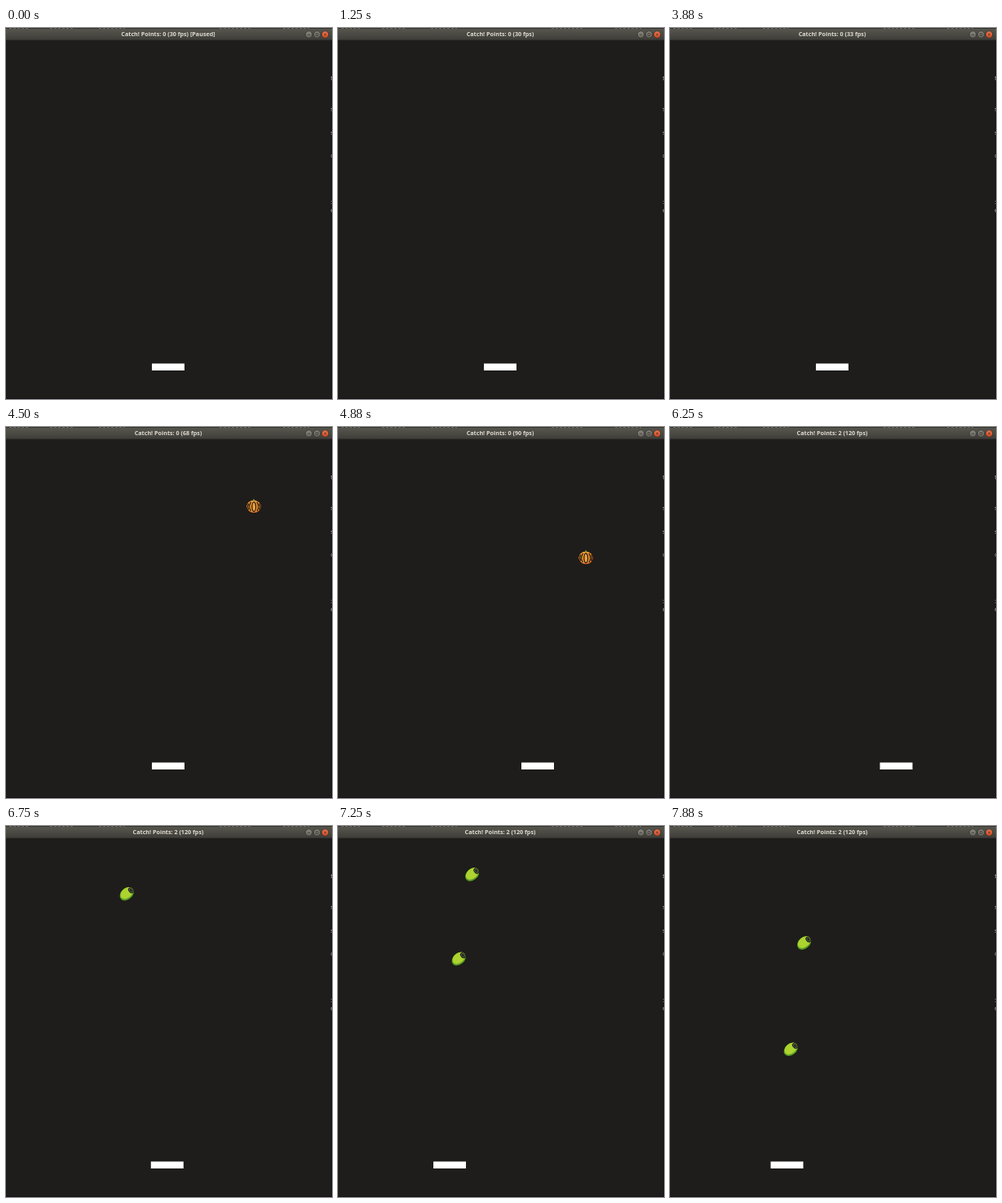
Recreate the animation shown at these times as an HTML page. Size 400 by 455 pixels, loop 8000 ms.

```html
<!DOCTYPE html>
<html lang="en">
<head>
<meta charset="utf-8">
<title>Catch!</title>
<style>
  html, body { margin: 0; width: 100%; height: 100%; overflow: hidden; background: #1e1d1b; }
  svg { display: block; width: 100vw; height: 100vh; }
  text { font-family: "Open Sans", "Noto Sans", sans-serif; }
  #title { font-size: 7.2px; font-weight: 700; fill: #dfdbd2; text-anchor: middle; }
  .edge { font-size: 7px; fill: #b9b9b4; }
</style>
</head>
<body>
<svg viewBox="0 0 400 455">
  <defs>
    <linearGradient id="bar" x2="0" y2="1">
      <stop offset="0" stop-color="#58574f"/>
      <stop offset="1" stop-color="#3e3d38"/>
    </linearGradient>
    <linearGradient id="grey" x2="0" y2="1">
      <stop offset="0" stop-color="#8b887f"/>
      <stop offset="1" stop-color="#66645c"/>
    </linearGradient>
    <linearGradient id="red" x2="0" y2="1">
      <stop offset="0" stop-color="#f0764f"/>
      <stop offset="1" stop-color="#d9481f"/>
    </linearGradient>
    <g id="olive">
      <g transform="rotate(-40)">
        <ellipse rx="10.2" ry="7.6" fill="#151a10"/>
        <ellipse rx="9.6" ry="7" fill="#5a9a28"/>
        <ellipse cx=".7" cy="-.8" rx="8.8" ry="6" fill="#acd32f"/>
        <ellipse cx="6.6" cy="-.1" rx="2.7" ry="3.9" fill="#1c1d18"/>
        <ellipse cx="6.8" cy="-.1" rx="1.5" ry="2.5" fill="none" stroke="#77806a" stroke-width=".7"/>
      </g>
    </g>
    <g id="pumpkin">
      <ellipse cy=".5" rx="9.3" ry="8.2" fill="#17130f"/>
      <ellipse cy=".5" rx="8.8" ry="7.7" fill="#d8682b"/>
      <ellipse cx="-.5" cy="0" rx="8.2" ry="7.2" fill="#f3a138"/>
      <g fill="none" stroke="#2b1b10" stroke-width="1.3">
        <ellipse cy=".8" rx="2.4" ry="5.8"/>
        <path d="M-3.6-5.2Q-7.2 .5-3.8 6M3.6-5.2Q7.2 .5 3.8 6M-6.6-3.4Q-8.4 .5-6.4 4.4M6.6-3.4Q8.4 .5 6.4 4.4"/>
      </g>
      <path d="M-1-5.6L-.7-8.8L.8-8.4L1.1-5.6Z" fill="#9a9a3a"/>
    </g>
  </defs>

  <rect width="400" height="455" fill="#1e1d1b"/>
  <rect id="paddle" y="411.5" width="40" height="8.5" fill="#fff"/>
  <use id="f0" href="#pumpkin"/>
  <use id="f1" href="#olive"/>
  <use id="f2" href="#olive"/>

  <rect width="400" height="15" fill="url(#bar)"/>
  <rect width="400" height="1" fill="#34332f"/>
  <path d="M4 .5H28M54 .5H84M114 .5H146M262 .5H300M340 .5H372" stroke="#77756c" stroke-width=".7" stroke-dasharray="3 2"/>
  <rect y="14.5" width="400" height=".8" fill="#2a2926"/>
  <text id="title" x="199" y="10.4"></text>
  <g stroke="#32312d" stroke-width=".7">
    <circle cx="371.6" cy="8" r="4.2" fill="url(#grey)"/>
    <circle cx="381.6" cy="8" r="4.2" fill="url(#grey)"/>
    <circle cx="391.6" cy="8" r="4.2" fill="url(#red)"/>
  </g>
  <path d="M370 8.2H373.2M380.2 6.6H383V9.4H380.2ZM390.2 6.6L393 9.4M393 6.6L390.2 9.4" fill="none" stroke="#3b3a35" stroke-width=".8"/>

  <rect y="454" width="400" height="1" fill="#151016"/>
  <rect x="399" y="15" width="1" height="440" fill="#151016"/>
  <g class="edge">
    <text x="398.3" y="64">t</text>
    <text x="398.3" y="102">s</text>
    <text x="398.3" y="131">s</text>
    <text x="398.3" y="159">o</text>
    <text x="398.3" y="216">:</text>
    <text x="398.3" y="226">e</text>
  </g>
</svg>
<script>
  const LOOP = 8000, STEP = 12.5;
  const $ = id => document.getElementById(id);

  // Paddle path: time in ms, left edge
  const path = [[0, 179], [4590, 179], [4880, 225], [5260, 286], [6070, 286], [6380, 237],
                [7130, 117], [7250, 117], [7380, 115], [7750, 115], [7880, 123.5], [LOOP, 123.5]];

  // Falling items: x, visible span, then y, speed and half acceleration at time t0
  const items = [
    { x: 304.2, from: 4000, to: 6130, t0: 4880, y: 160, v: 175, a: 25 },
    { x: 148.2, from: 6380, to: LOOP, t0: 6380, y: 29, v: 141.1, a: 14.8 },
    { x: 164.6, from: 7130, to: LOOP, t0: 7250, y: 59.5, v: 133.3, a: 0 }
  ];

  function paddleX(t) {
    const i = Math.max(1, path.findIndex(p => p[0] >= t));
    const [t0, x0] = path[i - 1], [t1, x1] = path[i];
    return x0 + (x1 - x0) * (t - t0) / (t1 - t0);
  }

  function titleAt(t) {
    const fps = t < 3880 ? 30 : Math.min(120, Math.round(33 + (t - 3880) * 0.057));
    return `Catch! Points: ${t < 6130 ? 0 : 2} (${fps} fps)${t < 1250 ? " [Paused]" : ""}`;
  }

  // The picture advances eight times a second, on whole hundredths
  function snap(t) {
    const at = k => Math.ceil(k * STEP) * 10;
    const k = Math.floor(t / 125);
    return at(k) > t ? at(k - 1) : at(k);
  }

  function draw() {
    const t = snap(performance.now() % LOOP);
    $("title").textContent = titleAt(t);
    $("paddle").setAttribute("x", paddleX(t));
    items.forEach((f, i) => {
      const s = (t - f.t0) / 1000, el = $("f" + i);
      el.setAttribute("visibility", t >= f.from && t < f.to ? "visible" : "hidden");
      el.setAttribute("transform", `translate(${f.x} ${f.y + f.v * s + f.a * s * s})`);
    });
    requestAnimationFrame(draw);
  }
  draw();
</script>
</body>
</html>
```
